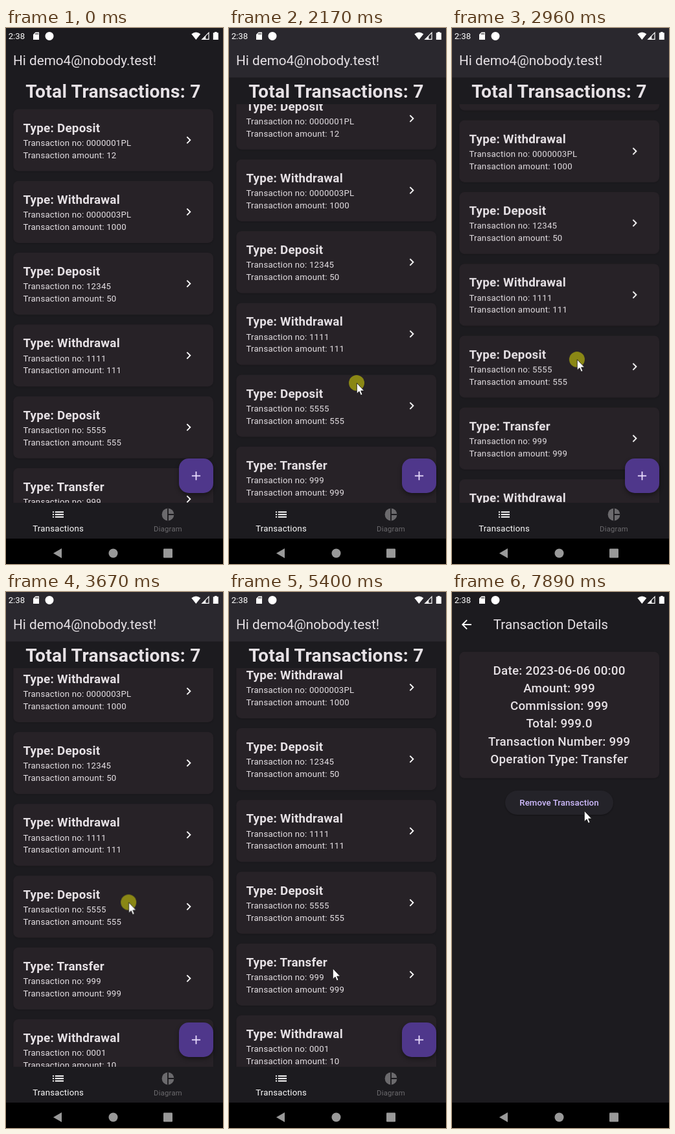
Recreate the animation shown at these times as an HTML page. Size 335 by 823 pixels, loop 7.99 s.

```html
<!DOCTYPE html>
<html lang="en">
<head>
<meta charset="utf-8">
<title>Transactions</title>
<style>
  :root { --dp: .9423px; }
  html, body { margin: 0; width: 100%; height: 100%; overflow: hidden; background: #000; }
  svg { display: block; width: 100vw; height: 100vh; }
  text { font: calc(14 * var(--dp)) Roboto, sans-serif; letter-spacing: calc(.25 * var(--dp)); fill: #e6e1e5; }
  .bar { font-size: calc(22 * var(--dp)); letter-spacing: 0; }
  .total { font-size: calc(30 * var(--dp)); font-weight: 700; }
  .title { font-size: calc(20 * var(--dp)); font-weight: 700; }
  .detail { font-size: calc(20 * var(--dp)); font-weight: 500; }
  .button { font-weight: 500; letter-spacing: calc(.1 * var(--dp)); fill: #d0bcff; }
  .tab { fill: #fff; }
  .idle { font-size: calc(12 * var(--dp)); fill: #6b6a6d; }
  .clock { letter-spacing: 0; fill: #fff; }
  .total, .detail, .button, .tab { text-anchor: middle; }
  .page { transform-origin: 167.5px 392px; }
  .card { fill: #272227; filter: drop-shadow(0 1px 1px rgba(0, 0, 0, .15)); }
  .icon { fill: none; stroke: #fff; stroke-width: 2; }
</style>
</head>
<body>
<svg viewBox="0 0 335 823">
  <defs>
    <clipPath id="screen"><rect width="335" height="784"/></clipPath>
    <clipPath id="viewport"><rect y="117" width="335" height="612"/></clipPath>
  </defs>

  <g clip-path="url(#screen)">
    <g id="listPage" class="page">
      <rect width="335" height="784" fill="#1c1b1f"/>
      <rect id="raisedBar" width="335" height="76" fill="#2a282e" opacity="0"/>
      <text class="bar" x="11" y="56.7">Hi demo4@nobody.test!</text>
      <text class="total" x="165.4" y="106.7">Total Transactions: 7</text>
      <g clip-path="url(#viewport)"><g id="cards"></g></g>
      <g id="tabs"></g>
      <rect x="267" y="661" width="53" height="53" rx="15" fill="#4f378b"
            style="filter:drop-shadow(0 3px 3px rgba(0,0,0,.4))"/>
      <path d="M286.9 687.6h13.2M293.5 681v13.2" stroke="#eaddff" stroke-width="1.8"/>
    </g>
    <rect id="scrim" width="335" height="784" opacity="0"/>
    <g id="detailPage" class="page" opacity="0">
      <rect width="335" height="784" fill="#1c1b1f"/>
      <text class="bar" x="63.7" y="56.7">Transaction Details</text>
      <rect class="card" x="11.3" y="91.8" width="308.7" height="194" rx="8"/>
      <g id="details"></g>
      <rect x="82" y="305" width="167" height="37" rx="18.5" fill="#242329"
            style="filter:drop-shadow(0 1px 1px rgba(0,0,0,.35))"/>
      <text class="button" x="165.5" y="328">Remove Transaction</text>
    </g>
  </g>

  <g fill="#fff">
    <text class="clock" x="3.7" y="17">2:38</text>
    <path d="M51 6.5H45.5L42 10V18H51Z"/>
    <path d="M45.7 8v2M47.5 8v2M49.3 8v2" stroke="#1c1b1f"/>
    <circle cx="67" cy="12.4" r="6.5"/>
    <path d="M293.3 18L286.3 9.2Q293.3 3.8 300.3 9.2Z"/>
    <path d="M302.8 17.4L313 7.2V17.4Z" fill="none" stroke="#fff" stroke-width="1.2"/>
    <path d="M302.5 17.8L308.3 12V17.8Z"/>
    <path d="M319.8 7.3H322V6H325.6V7.3H327.8V18H319.8Z"/>
  </g>

  <g fill="#999">
    <path d="M73 806.5L86 799V814Z"/>
    <circle cx="165.5" cy="806.5" r="7"/>
    <rect x="243" y="799.6" width="14" height="13.8" rx="1.2"/>
  </g>

  <g id="pointer">
    <circle id="press" r="12" fill="#ff0" fill-opacity=".46" opacity="0"/>
    <path d="M.3 0V16.4L4 12.9L6.4 18.8L9 17.7L6.6 12.1H11.6Z" fill="#fff" stroke="#111" stroke-width=".8"/>
  </g>
</svg>

<script>
const LOOP = 7990;
const DP = .9423;
const $ = id => document.getElementById(id);

const label = (cls, x, y, text) => `<text class="${cls}" x="${x}" y="${y}">${text}</text>`;
// Line icons on a 24 dp grid, placed by their centre.
const icon = (path, x, y, extra = '') =>
  `<path class="icon" d="${path}" transform="translate(${x} ${y}) scale(${DP}) translate(-12 -12)" ${extra}/>`;

const PAD = 16 * DP, TITLE_LINE = 29 * DP, BODY_LINE = 20 * DP;
const CARD_HEIGHT = 2 * PAD + TITLE_LINE + 2 * BODY_LINE;
// Baseline of text centred in a line box.
const baseline = (top, line, size) => top + line / 2 + .342 * size * DP;

const transactions = [
  ['Deposit', '0000001PL', 12],
  ['Withdrawal', '0000003PL', 1000],
  ['Deposit', '12345', 50],
  ['Withdrawal', '1111', 111],
  ['Deposit', '5555', 555],
  ['Transfer', '999', 999],
  ['Withdrawal', '0001', 10]
];
$('cards').innerHTML = transactions.map(([type, number, amount], i) => {
  const y = 124.5 + i * (CARD_HEIGHT + PAD);
  const body = y + PAD + TITLE_LINE;
  return `<rect class="card" x="11.3" y="${y}" width="308.7" height="${CARD_HEIGHT}" rx="8"/>` +
    label('title', 26.4, baseline(y + PAD, TITLE_LINE, 20), `Type: ${type}`) +
    label('body', 26.4, baseline(body, BODY_LINE, 14), `Transaction no: ${number}`) +
    label('body', 26.4, baseline(body + BODY_LINE, BODY_LINE, 14), `Transaction amount: ${amount}`) +
    icon('M9.3 6.7L14.6 12L9.3 17.3', 281.9, y + CARD_HEIGHT / 2);
}).join('');

$('tabs').innerHTML =
  '<rect y="729" width="335" height="55" fill="#1c1b1f"/>' +
  icon('M3 8h18M3 12h18M3 16h18', 80.5, 747, 'stroke-dasharray="2 2 14 9"') +
  label('tab', 80.7, 772.6, 'Transactions') +
  '<circle cx="250" cy="747" r="9.4" fill="#6b6a6d"/>' +
  icon('M12 2v20M12 12h10', 250, 747, 'style="stroke:#1c1b1f"') +
  label('tab idle', 250, 773, 'Diagram');

$('details').innerHTML = icon('M20 12H6M12.7 4.7L5.4 12L12.7 19.3', 22.4, 50) + [
  'Date: 2023-06-06 00:00', 'Amount: 999', 'Commission: 999',
  'Total: 999.0', 'Transaction Number: 999', 'Operation Type: Transfer'
].map((text, i) => label('detail', 165.6, 126.5 + i * TITLE_LINE, text)).join('');

// Each step is [time in ms, value, easing towards the next step].
function play(id, prop, steps, format = v => v) {
  const all = [[0, steps[0][1]], ...steps, [LOOP, steps.at(-1)[1]]];
  $(id).animate(
    all.map(([time, value, easing = 'linear']) => ({ offset: time / LOOP, [prop]: format(value), easing })),
    { duration: LOOP, iterations: Infinity });
}
const move = ([x, y]) => `translate(${x}px, ${y}px)`;
const scale = s => `scale(${s})`;
const shown = spans => spans.flatMap(([from, to]) =>
  [[from, 0, 'step-start'], [from + 1, 1, 'step-end'], [to, 0]]);

const DRAG = 1900, CATCH_UP = 2170, DROP = 3900, TAP = 5250;

play('pointer', 'transform', [
  [190, [345, 485]],
  [960, [212, 551]],
  [1500, [200, 608]],
  [DRAG, [200, 608]],
  [CATCH_UP, [197, 545]],
  [DROP, [188, 466]],
  [4250, [188, 466], 'ease-in-out'],
  [TAP, [160, 578]],
  [6030, [160, 578]],
  [6810, [165, 543]],
  [7450, [218, 390]],
  [7880, [204, 336]]
], move);
play('press', 'opacity', shown([[1660, DROP], [TAP, 5390]]));

play('cards', 'transform', [
  [DRAG, 0],
  [CATCH_UP, 33, 'cubic-bezier(.33, .45, .67, .9)'],
  [DROP, 136]
], y => move([0, -y]));
play('raisedBar', 'opacity', [[DRAG, 0], [DRAG + 200, 1]]);

const OPEN = 5550, OPENED = 5860;
const emphasized = 'cubic-bezier(.2, .6, .1, 1)';
play('listPage', 'transform', [[OPEN, 1, emphasized], [OPENED, 1.05]], scale);
play('scrim', 'opacity', [[OPEN + 60, 0], [OPEN + 130, .6]]);
play('detailPage', 'transform', [[OPEN, .85, emphasized], [OPENED, 1]], scale);
play('detailPage', 'opacity', [[OPEN + 40, 0], [OPEN + 90, 1]]);
</script>
</body>
</html>
```
